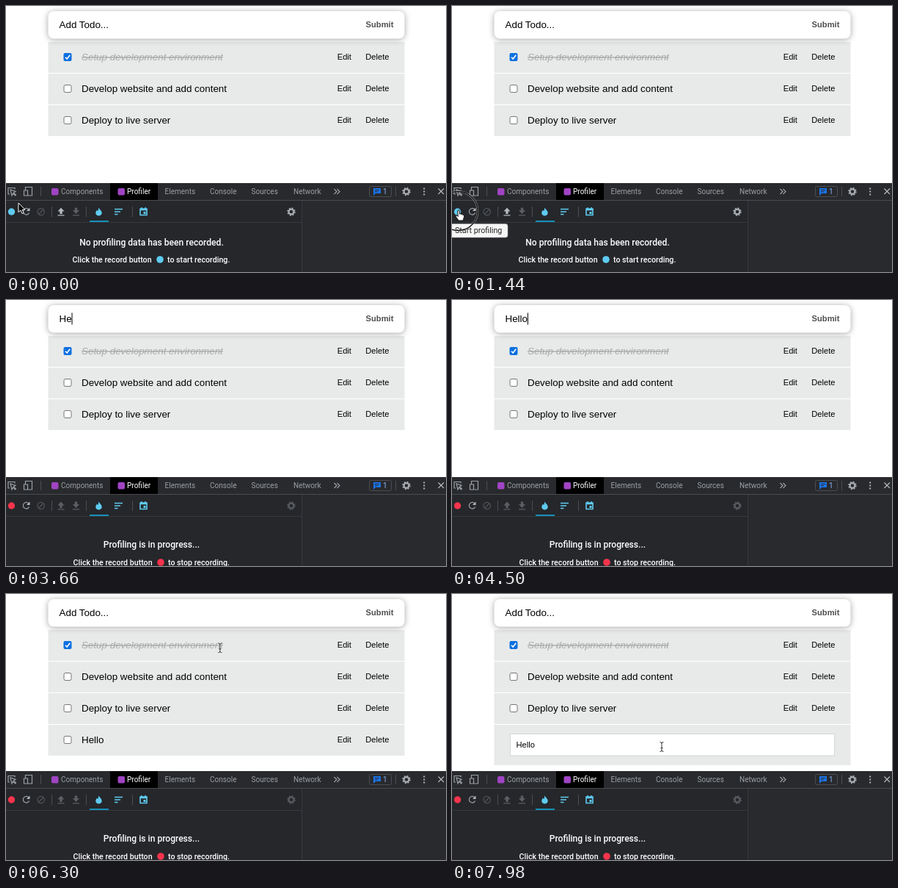
Recreate the animation shown at these times as an HTML page. Size 600 px wide and 362 px high, loop 8 s.

```html
<!DOCTYPE html>
<html lang="en">
<head>
<meta charset="utf-8">
<title>Todo list profiling</title>
<style>
html, body { margin: 0; width: 100%; height: 100%; overflow: hidden; background: #fff; }
svg { display: block; width: 600px; height: 362px; }
text { white-space: pre; }
.page { font-family: "Liberation Sans", Arial, sans-serif; font-size: 13.4px; fill: #000; }
.small { font-size: 11.17px; }
.done { font-style: italic; fill: #a9abab; text-decoration: line-through; }
.tools { font-family: Roboto, sans-serif; font-size: 10.05px; fill: #9aa0a6; }
.head { font-size: 12.1px; font-weight: 500; fill: #fff; text-anchor: middle; }
.sub { font-size: 10.65px; font-weight: 500; fill: #fff; }
.tip { font-size: 10.7px; fill: #222; }
.line { fill: none; stroke: #9aa0a6; stroke-width: 1.2; }
.cyan { fill: none; stroke: #5fcbf0; stroke-width: 1.6; }
.dim { opacity: .38; }
#bar { filter: drop-shadow(0 1px 4.5px rgba(0,0,0,.36)); }
</style>
</head>
<body>
<svg viewBox="0 0 600 362">
  <defs>
    <g id="gear">
      <circle r="3.4" fill="none" stroke="#a8adb2" stroke-width="2.2"/>
      <circle r="4.9" fill="none" stroke="#a8adb2" stroke-width="1.6" stroke-dasharray="2 1.85"/>
    </g>
    <path id="bars" d="M-2.5 -6.5Q0 -6.5 0 -4.5Q0 -6.5 2.5 -6.5M0 -4.5V4.5M-2.5 6.5Q0 6.5 0 4.5Q0 6.5 2.5 6.5M-1.5 1.5H1.5"/>
  </defs>

  <g class="page">
    <g id="rows"></g>
    <g id="added">
      <rect x="57.5" y="178" width="486" height="42" fill="#e8eaea"/>
      <rect x="79" y="193.5" width="10" height="10" rx="2" fill="#fff" stroke="#767676"/>
      <text x="103" y="203">Hello</text>
      <text class="small" x="451.7" y="202">Edit</text>
      <text class="small" x="490.2" y="202">Delete</text>
    </g>
    <g id="edit">
      <rect x="57.5" y="178" width="486" height="55" fill="#e8eaea"/>
      <rect x="79.5" y="190.5" width="442" height="29.5" fill="#fff" stroke="#d5d7d7"/>
      <text class="small" x="87.5" y="208.5">Hello</text>
    </g>
    <rect id="bar" x="57.5" y="7" width="486" height="37.5" rx="8" fill="#fff"/>
    <text id="field" x="72.5" y="30"></text>
    <rect id="caret" y="17.5" width="1" height="16"/>
    <text class="small" x="490.6" y="29" font-weight="bold" fill="#4f4f4f">Submit</text>
  </g>

  <g class="tools">
    <rect y="241" width="600" height="121" fill="#292a2d"/>
    <rect x="142" y="241" width="65" height="23" fill="#000"/>
    <rect y="264" width="600" height="1" fill="#484b4f"/>
    <rect y="265" width="403" height="97" fill="#25272b"/>
    <path d="M0 294.5H403M403.5 265V362" stroke="#36393d"/>
    <path d="M47.5 246V259M531.5 246V259M62.5 273V287M109.5 273V287M172.5 273V287" stroke="#4a4d51"/>
    <g class="line">
      <path d="M5 256H3V247.5H12V249.5M6 250L8 258L9.5 255L12.5 258L13.5 257L10.5 254L13 252.5Z"/>
      <path d="M26.5 251V246.5H35.5V258H30M24.5 251H29.5V258H24.5Z"/>
      <path d="M447.5 249L451 252.5L447.5 256M451.5 249L455 252.5L451.5 256"/>
      <path d="M589.5 248.5L597 256M597 248.5L589.5 256" stroke="#b5b9bd"/>
    </g>
    <rect x="62" y="248" width="9.5" height="9.5" rx="2" fill="#a044c4"/>
    <rect x="152.5" y="248" width="9.5" height="9.5" rx="2" fill="#a044c4"/>
    <g id="tabs"></g>
    <rect x="495.5" y="245.5" width="30" height="14" rx="2" fill="none" stroke="#4a4d51"/>
    <path d="M501 248H511V255H504L501 258Z" fill="#1a73e8"/>
    <path d="M503 250.5H509M503 252.7H507" stroke="#292a2d"/>
    <text x="514" y="256" fill="#8ab4f8">1</text>
    <use href="#gear" x="546" y="252.5"/>
    <path d="M569.2 247.5h2v2h-2zM569.2 251.5h2v2h-2zM569.2 255.5h2v2h-2z" fill="#b0b4b8"/>

    <circle id="record" cx="7.5" cy="280" r="4.7"/>
    <path class="line" d="M31 277A4.3 4.3 0 1 0 31.6 281.5" stroke="#b5b9bd" stroke-width="1.5"/>
    <path d="M32.5 274.5V279H28Z" fill="#b5b9bd"/>
    <path class="line dim" d="M43 280a4.7 4.7 0 1 0 9.4 0a4.7 4.7 0 1 0 -9.4 0M44.5 283.2L51 276.8" stroke-width="1.4"/>
    <path id="up" d="M75 274.5L79.5 279.5H76.7V283H73.3V279.5H70.5ZM70.5 284.2H79.5V285.6H70.5Z" fill="#b5b9bd"/>
    <path class="dim" d="M95.5 283L100 278H97.2V274.5H93.8V278H91ZM91 284.2H100V285.6H91Z" fill="#b5b9bd"/>
    <path d="M126.5 274.5C127.5 277 131 278.5 130.7 282C130.3 286.5 122.6 286.5 122.3 282C122.2 280 123.3 278.6 124 277.5C124.5 279 125.5 279 125.8 278C126 277 125.8 276 126.5 274.5Z" fill="#5fcbf0"/>
    <rect x="114" y="292" width="26" height="2" fill="#178fb9"/>
    <path class="cyan" d="M148 276.5H159M148 280H156M148 283.5H152.5"/>
    <path class="cyan" d="M183 276H192V284.5H183ZM183 277.5H192M185 274V276M190 274V276" stroke-width="1.4"/>
    <rect x="187.5" y="280" width="3" height="3" fill="#5fcbf0"/>
    <use id="settings" href="#gear" x="389" y="280"/>

    <g id="idle">
      <text class="head" x="198.5" y="325.5">No profiling data has been recorded.</text>
      <text class="sub" x="90.5" y="348.5">Click the record button</text>
      <circle cx="210" cy="345" r="4.8" fill="#5fcbf0"/>
      <text class="sub" x="220" y="348.5">to start recording.</text>
    </g>
    <g id="busy">
      <text class="head" x="198.5" y="337">Profiling is in progress...</text>
      <text class="sub" x="91.5" y="360.5">Click the record button</text>
      <circle cx="211" cy="357" r="4.8" fill="#f8344c"/>
      <text class="sub" x="221" y="360.5">to stop recording.</text>
    </g>
    <g id="tip">
      <rect x="-4" y="296.5" width="80" height="18.5" rx="3" fill="#f6f6f6" stroke="#aaa" stroke-width=".6"/>
      <text class="tip" x="4" y="309">Start profiling</text>
    </g>
  </g>

  <g id="ring" fill="none">
    <circle stroke="#fff" stroke-opacity=".5" stroke-width="2.6"/>
    <circle stroke="#111" stroke-width="1.4"/>
  </g>
  <g id="cursor" stroke-linejoin="round">
    <path id="arrow" d="M0 0V12.5L3 10L5 14.5L7.2 13.5L5.2 9.2H9Z" fill="#000" stroke="#fff"/>
    <path id="hand" d="M-1.2 0C-1 -1.6 1 -1.6 1.2 0L1.6 4.2C2.5 3.3 3.6 3.6 3.8 4.7C4.8 4 5.6 4.5 5.8 5.4C6.8 5 7.5 5.7 7.5 6.8C7.5 9.5 6.6 10.5 6 13H-.2C-1.2 10.5 -3.2 9 -4 7C-4.2 5.7 -2.5 5.4 -.8 7.5Z" fill="#fff" stroke="#111"/>
    <g id="beam" fill="none">
      <use href="#bars" stroke="#fff" stroke-opacity=".6" stroke-width="2.2"/>
      <use href="#bars" stroke="#222" stroke-width=".9"/>
    </g>
  </g>
</svg>
<script>
const LOOP = 8000;
const $ = id => document.getElementById(id);
const show = (id, on) => { $(id).style.display = on ? '' : 'none'; };

const todos = ['Setup development environment', 'Develop website and add content', 'Deploy to live server'];
$('rows').innerHTML = todos.map((name, i) => {
  const y = 70 + 43 * i;
  const box = i
    ? `<rect x="79" y="${y - 5.5}" width="10" height="10" rx="2" fill="#fff" stroke="#767676"/>`
    : `<rect x="78.5" y="64" width="11" height="11" rx="2" fill="#0b70e0"/>
       <path d="M81 69.7L83.2 72L87.2 66.7" fill="none" stroke="#fff" stroke-width="1.6"/>`;
  return `<rect x="57.5" y="${y - 21}" width="486" height="42" fill="#e8eaea"/>${box}
    <text class="${i ? '' : 'done'}" x="103" y="${y + 4}">${name}</text>
    <text class="small" x="451.7" y="${y + 3}">Edit</text>
    <text class="small" x="490.2" y="${y + 3}">Delete</text>`;
}).join('');

const tabs = { Components: 75, Profiler: 165, Elements: 216.5, Console: 278, Sources: 334.5, Network: 392 };
$('tabs').innerHTML = Object.entries(tabs).map(([name, x]) =>
  `<text x="${x}" y="256"${name === 'Profiler' ? ' fill="#fff"' : ''}>${name}</text>`).join('');

// Pointer path: time, x, y, shape until the next key
const path = [
  [0, 17, 268, 'arrow'], [400, 11, 273, 'hand'], [540, 9, 274, 'hand'], [720, 9, 274, 'hand'],
  [1080, 9, 279, 'hand'], [1800, 9, 279, 'arrow'], [2340, 162, 36, 'beam'], [2460, 168, 28, 'beam'],
  [3360, 168, 28, ''], [4860, 168, 28, 'beam'], [5300, 485, 25, 'hand'], [5400, 509, 24, 'hand'],
  [6120, 509, 24, 'beam'], [6300, 292.5, 73, 'beam'], [6420, 235, 125, 'beam'], [6600, 290, 185, 'arrow'],
  [6900, 468, 212, 'arrow'], [6960, 464, 209, 'hand'], [7140, 464, 209, 'hand'], [7260, 461, 196, 'hand'],
  [7500, 461, 196, 'beam'], [7800, 461, 196, 'beam'], [7980, 286, 208, 'beam'], [LOOP, 286, 208, 'beam']
];
// Click rings: start, end, x, y, full radius
const clicks = [
  [1320, 1500, 8.5, 279, 26.5], [2400, 2640, 168, 28, 14],
  [5420, 5600, 511, 28, 26.5], [7320, 7500, 461, 194, 26.5]
];
const keys = [3360, 3600, 3780, 3960, 4200];

const slope = (i, c) => (path[i + 1][c] - path[i][c]) / (path[i + 1][0] - path[i][0]);

// Tangent that is flat at stops and turning points
function tangent(i, c) {
  if (!i || i === path.length - 1) return 0;
  const a = slope(i - 1, c), b = slope(i, c);
  return a * b > 0 ? 2 * a * b / (a + b) : 0;
}

function along(i, c, t) {
  const a = path[i], b = path[i + 1], d = b[0] - a[0], u = (t - a[0]) / d, v = 1 - u;
  return a[c] * v * v * (1 + 2 * u) + b[c] * u * u * (3 - 2 * u)
    + d * u * v * (v * tangent(i, c) - u * tangent(i + 1, c));
}

function draw(t) {
  const recording = t >= 1500;
  show('idle', !recording);
  show('busy', recording);
  show('tip', t >= 1200 && t < 1500);
  $('record').setAttribute('fill', recording ? '#f8344c' : '#5fcbf0');
  for (const id of ['up', 'settings']) $(id).setAttribute('class', recording ? 'dim' : '');

  const typed = t < 5700 ? keys.filter(k => t >= k).length : 0;
  $('field').textContent = typed ? 'Hello'.slice(0, typed) : 'Add Todo...';
  show('caret', (t >= 2580 && t < 3000) || (t >= 3360 && t < 4860));
  $('caret').setAttribute('x', 72.4 + (typed ? $('field').getComputedTextLength() : 0));
  show('added', t >= 5700 && t < 7500);
  show('edit', t >= 7500);

  const click = clicks.find(([from, to]) => t >= from && t < to);
  show('ring', click);
  if (click) {
    const [from, , x, y, size] = click;
    $('ring').setAttribute('transform', `translate(${x} ${y})`);
    for (const c of $('ring').children) c.setAttribute('r', size * Math.min(1, (t - from) / 120));
  }

  const i = path.findLastIndex(k => t >= k[0]);
  for (const id of ['arrow', 'hand', 'beam']) show(id, path[i][3] === id);
  $('cursor').setAttribute('transform', `translate(${along(i, 1, t)} ${along(i, 2, t)})`);
}

const start = performance.now();
function tick() {
  draw((performance.now() - start) % LOOP);
  requestAnimationFrame(tick);
}
tick();
</script>
</body>
</html>
```
